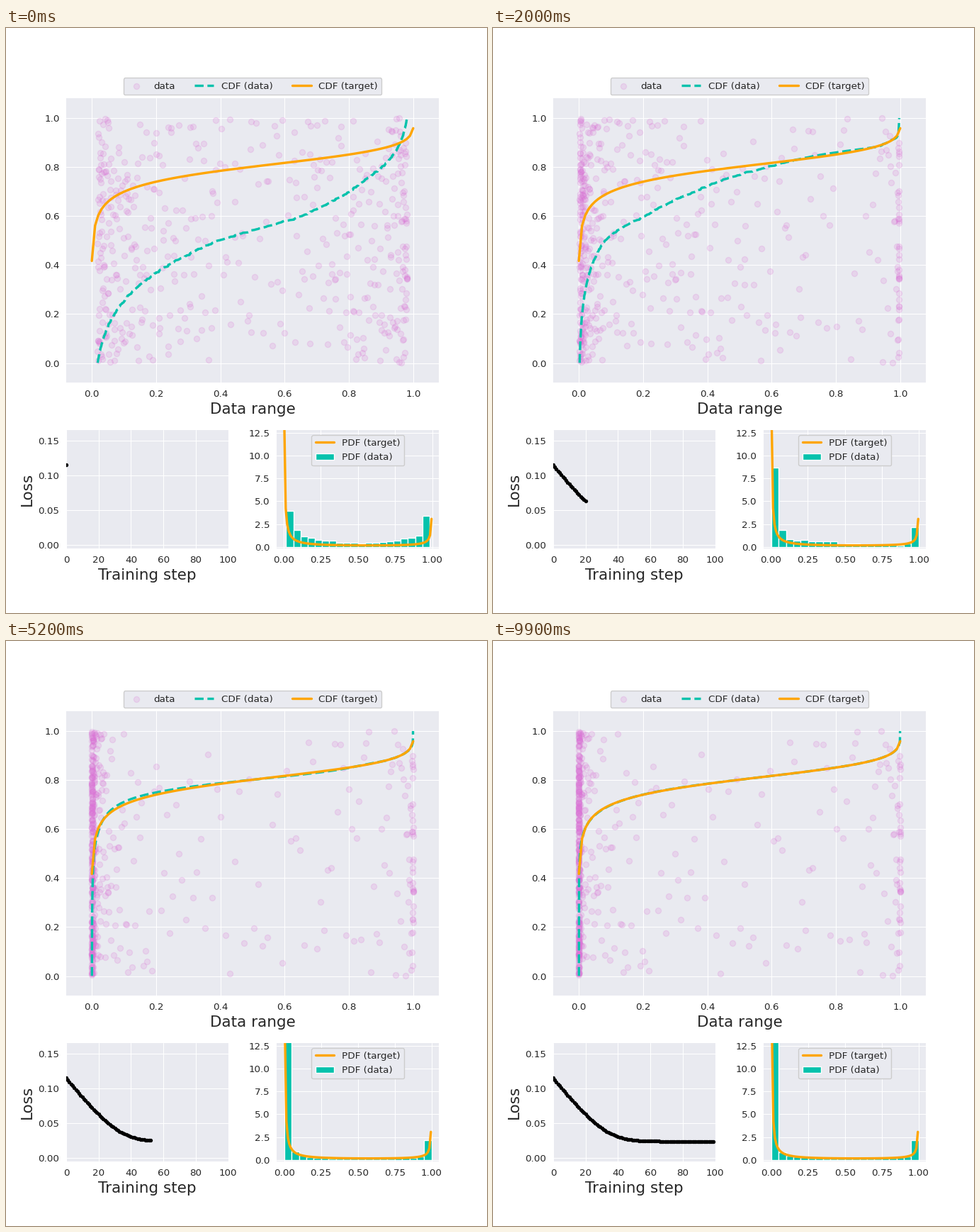
Recreate the animation shown at these times as a matplotlib script. Size 679 by 825 pixels, loop 10 s.

```python
import numpy as np
import matplotlib.pyplot as plt
from matplotlib.animation import FuncAnimation

W, H, DPI = 679, 825, 97
STEPS, N, BINS = 100, 500, 20
LR, B1, B2 = 0.1, 0.9, 0.999
SHIFT, SLOPE, EPS = 1.39, 0.25, 1e-3
TEAL, ORANGE, ORCHID = "#06C2AC", "orange", "orchid"

plt.rcParams.update({
    "font.family": "DejaVu Sans", "font.size": 10,
    "text.color": ".15", "axes.labelcolor": ".15",
    "xtick.color": ".15", "ytick.color": ".15",
    "axes.facecolor": "#E9EAF0", "axes.edgecolor": "white", "axes.linewidth": 0,
    "axes.grid": True, "axes.axisbelow": True, "axes.labelsize": 16,
    "grid.color": "white", "grid.linewidth": 0.8,
    "xtick.major.size": 0, "ytick.major.size": 0,
    "xtick.major.pad": 7, "ytick.major.pad": 7,
    "lines.solid_capstyle": "round", "legend.framealpha": 1,
})


def sigmoid(z):
    return 1 / (1 + np.exp(-z))


def target_cdf(x):
    x = np.clip(x, EPS, 1 - EPS)
    return sigmoid(SHIFT + SLOPE * np.log(x / (1 - x)))


def train(z):
    """Fit logit samples to the target CDF with Adam, keeping every step."""
    m, v = np.zeros(N), np.zeros(N)
    path, loss = [], []
    for t in range(1, STEPS + 1):
        x = sigmoid(z)
        c = target_cdf(x)
        path.append(x)
        loss.append(np.mean((c - rank) ** 2))
        inside = (x > EPS) & (x < 1 - EPS)
        g = 2 / N * (c - rank) * c * (1 - c) * SLOPE * inside
        m = B1 * m + (1 - B1) * g
        v = B2 * v + (1 - B2) * g * g
        z = z - LR * (m / (1 - B1 ** t)) / (np.sqrt(v / (1 - B2 ** t)) + 1e-8)
    return np.array(path), np.array(loss)


# Sorted samples, close to uniform on [-4, 4] in logit space.
rng = np.random.default_rng(4)
rank = (np.arange(N) + 0.5) / N
start = np.interp(rank, [0, 0.3, 0.5, 0.6, 0.75, 0.9, 1],
                  [-4, -1.87, -0.44, 0.64, 1.77, 3.2, 3.95])
start = np.sort(start + rng.normal(0, 0.02, N))
height = rng.uniform(0, 1, N)
path, loss = train(start)

grid = np.linspace(0, 1, 100)
cdf = target_cdf(grid)
mid = (grid[1:] + grid[:-1]) / 2
pdf = np.diff(cdf) / np.diff(grid)

fig = plt.figure(figsize=(W / DPI, H / DPI), dpi=DPI, facecolor="white")
gs = fig.add_gridspec(3, 2, hspace=0.4, wspace=0.3)
top = fig.add_subplot(gs[:2, :])
low = fig.add_subplot(gs[2, 0])
hist = fig.add_subplot(gs[2, 1])

dots = top.scatter(path[0], height, color=ORCHID, alpha=0.18, label="data")
curve, = top.plot([], [], "--", color=TEAL, lw=2.5, label="CDF (data)")
top.plot(grid, cdf, color=ORANGE, lw=2.5, label="CDF (target)")
top.set(xlim=(-0.08, 1.08), ylim=(-0.08, 1.08), xlabel="Data range")
top.legend(loc="center", bbox_to_anchor=(0.5, 1.0416), ncol=3)

trace, = low.plot([], [], ".k")
low.set(xlim=(0, 100), ylim=(-0.005, 0.165), xlabel="Training step", ylabel="Loss")

hist.plot(mid, pdf, color=ORANGE, lw=2.5, label="PDF (target)")
bars = hist.bar(np.arange(BINS) / BINS, np.ones(BINS), 1 / BINS, align="edge",
                color=TEAL, edgecolor="white", lw=1, label="PDF (data)")
hist.set_ylim(-0.2, 12.8)
hist.legend(loc="upper center")


def draw(i):
    x = path[i]
    dots.set_offsets(np.column_stack([x, height]))
    curve.set_data(x, rank)
    trace.set_data(np.arange(i + 1), loss[:i + 1])
    dens, edges = np.histogram(x, BINS, density=True)
    for bar, h, left, right in zip(bars, dens, edges, edges[1:]):
        bar.set(x=left, width=right - left, height=h)
    lo, hi = min(mid[0], x.min()), max(mid[-1], x.max())
    pad = 0.05 * (hi - lo)
    hist.set_xlim(lo - pad, hi + pad)
    return dots, curve, trace


anim = FuncAnimation(fig, draw, frames=STEPS, interval=100, repeat=True, repeat_delay=0)
plt.show()
```
